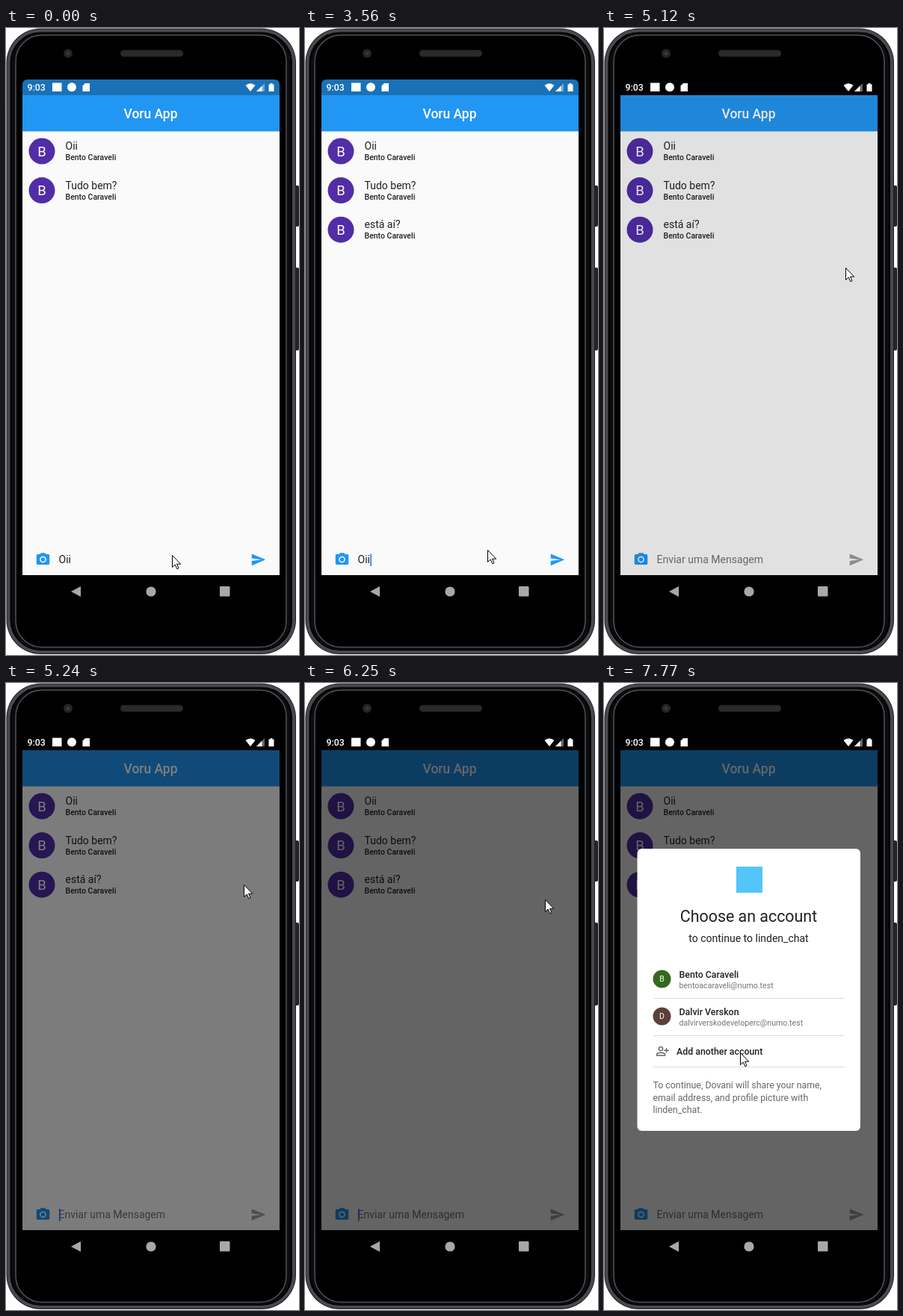
An HTML page that plays this animation: 392 px wide and 840 px high, repeating every 8000 ms.

```html
<!DOCTYPE html>
<html lang="en">
<head>
<meta charset="utf-8">
<title>Chat sign-in</title>
<style>
  html, body { margin: 0; width: 100%; height: 100%; overflow: hidden; background: #fff; }
  svg { display: block; width: 100vw; height: 100vh; }
  text { font: 14px Roboto, sans-serif; white-space: pre; }
  .mid { text-anchor: middle; }
  .strong { font-weight: 500; }
  .title { font-size: 17.5px; fill: #fff; }
  .initial { font-size: 18.5px; fill: #fff; }
  .sender { font-size: 10.5px; fill: #212121; }
  .body { fill: #212121; }
  .hint { fill: #000; fill-opacity: .54; }
  .heading { font-size: 21.4px; fill: #202124; }
  .small { font-size: 12.35px; }
  .mail { font-size: 10.6px; fill: #757575; }
  .badge { font-size: 10.5px; fill: #fff; }
</style>
</head>
<body>
<svg viewBox="0 0 392 840">
  <!-- Phone -->
  <g fill="#242529">
    <rect x="385" y="211" width="7" height="55" rx="2"/>
    <rect x="385" y="321" width="7" height="111" rx="2"/>
  </g>
  <rect x=".5" y=".5" width="387.5" height="838.5" rx="46" fill="#1c1d20"/>
  <rect x="3.5" y="3.5" width="381.5" height="832.5" rx="43" stroke="#48494e" stroke-width="4"/>
  <rect x="8" y="6.5" width="372.5" height="826.5" rx="39" fill="#0c0c0e"/>
  <rect x="13" y="9.5" width="362" height="820" rx="35" stroke="#505156" stroke-width="1.5"/>
  <circle cx="83" cy="34" r="6" fill="#252527"/>
  <circle cx="83" cy="34" r="2.5" fill="#39393c"/>
  <rect x="153" y="29.5" width="84" height="9" rx="4.5" fill="#2a2a2d"/>
  <g fill="#a8a8a8">
    <path d="M87 755L100 748V762Z"/>
    <circle cx="194" cy="755" r="6.6"/>
    <rect x="286" y="748" width="13.5" height="13.5" rx="1"/>
  </g>

  <!-- App -->
  <path d="M22 90H366V733H22Z" fill="#fafafa"/>
  <path d="M22 90H366V138.500H22Z" fill="#2196f3"/>
  <text class="title strong mid" x="193.500" y="121">Voru App</text>
  <g id="messages"></g>
  <path fill="#2196f3" fill-rule="evenodd" transform="translate(39 701.5) scale(.876)"
    d="M9 2L7.200 4H4Q2 4 2 6V18Q2 20 4 20H20Q22 20 22 18V6Q22 4 20 4H16.800L15 2ZM12 7a5 5 0 0 1 0 10a5 5 0 0 1 0-10ZM12 8.800a3.200 3.200 0 0 0 0 6.400a3.200 3.200 0 0 0 0-6.400Z"/>
  <text id="input" x="70.500" y="717"></text>
  <rect id="caret" y="704.500" width="1.700" height="16.500" fill="#2f7df0"/>
  <path id="send" transform="translate(327 701.8) scale(.876)" d="M2 21L23 12L2 3V10L17 12L2 14Z"/>
  <path id="dim" d="M22 90H366V733H22Z"/>

  <!-- Status bar -->
  <path id="status" d="M22 90V76Q22 69 29 69H359Q366 69 366 76V90Z"/>
  <g fill="#fff">
    <text class="strong" style="font-size:12.3px" x="28.500" y="84">9:03</text>
    <rect x="62" y="73.500" width="12.500" height="11.500"/>
    <circle cx="88" cy="79.300" r="6"/>
    <path d="M106 74H112V85H102.500V77.500Z"/>
    <path d="M320.500 76.800Q327 71.600 333.500 76.800L327 85Z"/>
    <path d="M335 85L346 74V85Z" fill-opacity=".4"/>
    <path d="M335 85L342.500 77.500V85Z"/>
    <path d="M351.500 75.500H353.500V74H356.500V75.500H358.500V85H351.500Z"/>
  </g>

  <!-- Account chooser -->
  <g id="dialog">
    <rect x="44.500" y="229" width="298.500" height="378" rx="6" fill="#fff"/>
    <rect x="177" y="253" width="35" height="35" fill="#54c5f8"/>
    <text class="heading mid" x="193.500" y="327">Choose an account</text>
    <text class="body mid" x="193.500" y="354">to continue to linden_chat</text>
    <g id="accounts"></g>
    <g fill="none" stroke="#5f6368" stroke-width="1.400">
      <circle cx="76" cy="497" r="2.600"/>
      <path d="M70.500 506V504.500Q71 502.300 76 502.300T81.500 504.500V506ZM83.500 496V502.500M80.300 499.200H86.800"/>
    </g>
    <text class="small strong" fill="#202124" x="97" y="505">Add another account</text>
    <path d="M66 429.500H322M66 479.500H322M66 521.500H322" stroke="#dadce0"/>
    <g fill="#666">
      <text class="small" x="65.500" y="550">To continue, Dovani will share your name,</text>
      <text class="small" x="65.500" y="566.500">email address, and profile picture with</text>
      <text class="small" x="65.500" y="583">linden_chat.</text>
    </g>
  </g>

  <path id="pointer" d="M.5 .5V16.500L4.200 13L6.800 18.700L9 17.700L6.500 12.200H11.700Z" fill="#fff" stroke="#000"/>
</svg>
<script>
const LOOP = 8000;
const $ = id => document.getElementById(id);
const set = (id, attrs) => {
  for (const name in attrs) $(id).setAttribute(name, attrs[name]);
};
const clamp = v => Math.min(1, Math.max(0, v));
const ramp = (t, from, to) => clamp((t - from) / (to - from));

$('messages').innerHTML = ['Oii', 'Tudo bem?', 'está aí?'].map((body, i) => `
  <g transform="translate(0 ${i * 52.6})">
    <circle cx="48" cy="165" r="17.500" fill="#512da8"/>
    <text class="initial mid" x="48" y="171.500">B</text>
    <text class="body" x="79.500" y="163">${body}</text>
    <text class="sender strong" x="79.500" y="177">Bento Caraveli</text>
  </g>`).join('');

const accounts = [
  ['Bento Caraveli', 'bentoacaraveli@numo.test', '#33691e'],
  ['Dalvir Verskon', 'dalvirverskodeveloperc@numo.test', '#5d4037'],
];
$('accounts').innerHTML = accounts.map(([name, mail, color], i) => `
  <g transform="translate(0 ${i * 50})">
    <circle cx="77.500" cy="403.500" r="12" fill="${color}"/>
    <text class="badge mid" x="77.500" y="407.300"></text>
    <text class="name small strong" fill="#202124" x="100.500" y="401.500">${name}</text>
    <text class="mail" x="100.500" y="416">${mail}</text>
  </g>`).join('');
const badges = document.querySelectorAll('.badge');
const names = document.querySelectorAll('.name');

// Pointer stops: time, x, y
const stops = [
  [0, 222, 706], [3559, 222, 706], [3560, 243, 699], [3620, 282, 702], [3680, 321, 712],
  [3740, 339, 718], [4249, 339, 718], [4250, 337, 715], [4619, 337, 715], [4620, 336, 714],
  [4920, 336, 714], [4980, 334, 655], [5050, 328, 470], [5120, 323, 322], [5180, 320, 290],
  [5240, 318, 270], [5310, 318, 258], [5440, 318, 258], [5700, 332, 185], [5850, 340, 156],
  [6000, 335, 195], [6250, 321, 290], [6800, 321, 290], [7250, 249, 419], [7770, 182, 495],
  [LOOP, 182, 495],
];
function pointerAt(t) {
  const i = stops.findIndex(stop => stop[0] > t);
  const [t0, x0, y0] = stops[i - 1], [t1, x1, y1] = stops[i];
  const k = (t - t0) / (t1 - t0);
  return [Math.round(x0 + (x1 - x0) * k), Math.round(y0 + (y1 - y0) * k)];
}

// The caret flips at each of these times, starting hidden
const blinks = [110, 640, 1150, 1630, 2130, 2630, 3130, 3640, 4140, 4620,
  5240, 5740, 6250, 6750, 7250, 7750];

function draw(t) {
  const sent = t >= 4800;
  const dimmed = t >= 5090;
  const named = t >= 6820;
  const open = ramp(t, 6470, 6640);
  const scale = .9 + .1 * open;

  $('messages').lastElementChild.style.display = t < 2130 ? 'none' : '';
  $('input').textContent = sent ? 'Enviar uma Mensagem' : 'Oii';
  set('input', { class: sent ? 'hint' : 'body' });
  set('send', { fill: sent ? '#9b9b9b' : '#2196f3' });
  set('caret', { x: sent ? 71 : 87.3, opacity: blinks.filter(b => b <= t).length % 2 });
  set('dim', { 'fill-opacity': .6 * ramp(t, 5090, 5270) });
  set('status', { fill: dimmed ? '#000' : '#1971b7' });

  badges.forEach((badge, i) => badge.textContent = named ? 'BD'[i] : 'bd'[i]);
  names.forEach(name => name.style.display = named ? '' : 'none');
  set('dialog', {
    opacity: open,
    transform: `translate(193.5 ${named ? 411 : 418}) scale(${scale}) translate(-193.5 -418)`,
  });
  set('pointer', { transform: `translate(${pointerAt(t)})` });
}

function tick() {
  draw(performance.now() % LOOP);
  requestAnimationFrame(tick);
}
tick();
</script>
</body>
</html>
```
